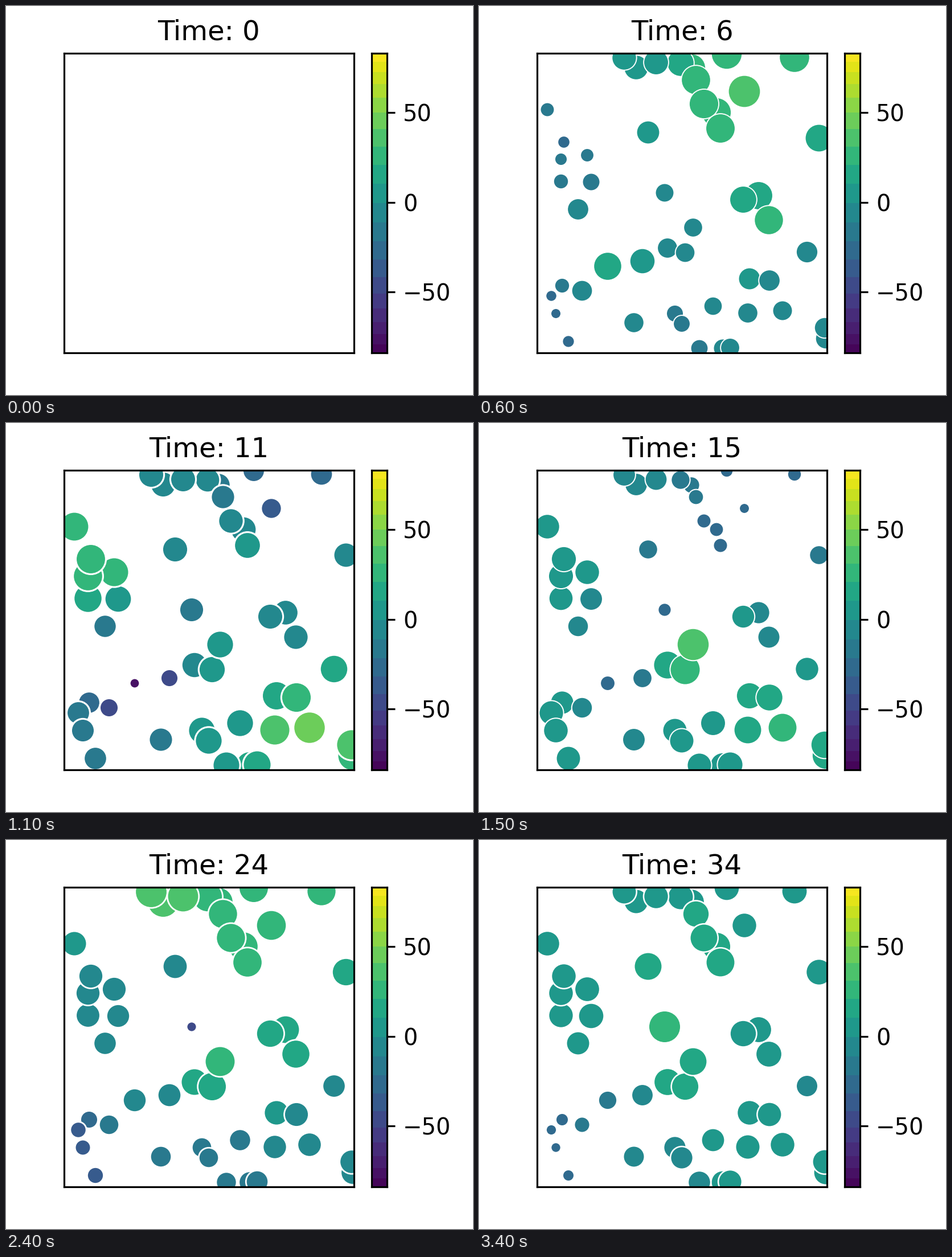
Recreate the animation shown at these times as a matplotlib script. Size 820 px wide and 683 px high, loop 3500 ms.

```python
import numpy as np
import matplotlib.pyplot as plt
from matplotlib.animation import FuncAnimation
from matplotlib.colors import BoundaryNorm, ListedColormap

W, H, DPI = 820, 683, 288
STEPS = 35
LEFT, TOP, RIGHT, BOTTOM = 102, 83, 611, 609
BAR_LEFT, BAR_RIGHT = 642, 669
V_MID, V_HALF = -0.4, 83.6
S_MIN, S_MAX = 20, 200

# Station positions in pixels, back to front.
STATIONS = np.array([
    (276, 108), (255, 91), (373, 109), (354, 100), (311, 99), (381, 130),
    (435, 84), (554, 90), (466, 150), (417, 187), (395, 172), (424, 215),
    (597, 232), (120, 182), (197, 309), (190, 262), (144, 308), (144, 269),
    (149, 239), (174, 357), (297, 222), (326, 328), (491, 333), (464, 340),
    (509, 376), (331, 425), (362, 433), (376, 389), (576, 432), (475, 479),
    (510, 482), (472, 539), (533, 535), (411, 527), (344, 540), (356, 558),
    (272, 556), (287, 448), (226, 457), (146, 491), (181, 500), (127, 509),
    (135, 540), (157, 589), (428, 601), (387, 601), (441, 600), (609, 584),
    (607, 565),
], float)

# One guiding station per region, with its value at each key time.
KEY_TIMES = [6, 11, 19, 24, 29, 34]
GUIDES = {
    1: (8, -5, 2, 40, 5, 4),
    8: (36, -34, -27, 29, -11, 5),
    11: (25, 1, -48, 26, -40, 19),
    18: (-22, 26, -12, -2, 15, 5),
    21: (-9, -12, -39, -50, 22, 30),
    24: (24, -8, 2, 19, 1, 9),
    27: (-8, 7, 64, 30, 2, 15),
    28: (-1, 12, -9, -9, -8, -4),
    32: (-6, 42, 1, -4, 12, 5),
    35: (-13, 7, 2, -21, -1, -2),
    38: (20, -75, 30, -7, -20, -12),
    42: (-25, -19, 30, -36, -19, -27),
}


def distance_weights(power=3):
    gap = STATIONS[:, None] - STATIONS[list(GUIDES)]
    w = (np.hypot(gap[..., 0], gap[..., 1]) + 0.01) ** -power
    return w / w.sum(axis=1, keepdims=True)


WEIGHTS = distance_weights()


def field(t):
    """Values of all stations: linear in time, distance-weighted in space."""
    guide = [np.interp(t, KEY_TIMES, v, period=STEPS) for v in GUIDES.values()]
    return WEIGHTS @ np.array(guide)


def pixel_axes(left, right):
    return fig.add_axes([left / W, 1 - BOTTOM / H,
                         (right - left) / W, (BOTTOM - TOP) / H])


# Colour bands are widest around zero and narrow towards both ends.
s = np.linspace(-1, 1, 21)
bands = V_MID + V_HALF * (s + np.sin(np.pi / 2 * s)) / 2
mids = (bands[:-1] + bands[1:]) / 2
colors = plt.get_cmap("viridis")((mids - bands[0]) / (2 * V_HALF))

plt.rcParams["font.family"] = "DejaVu Sans"
fig = plt.figure(figsize=(W / DPI, H / DPI), dpi=DPI, facecolor="white")

ax = pixel_axes(LEFT, RIGHT)
ax.set(xlim=(LEFT, RIGHT), ylim=(BOTTOM, TOP), xticks=[], yticks=[])
title = ax.set_title("Time: 0", fontsize=12, pad=6)
dots = ax.scatter(*STATIONS.T, c=np.zeros(len(STATIONS)), edgecolors="white",
                  cmap=ListedColormap(colors),
                  norm=BoundaryNorm(bands, len(colors)))

bar = pixel_axes(BAR_LEFT, BAR_RIGHT)
for low, high, color in zip(bands[:-1], bands[1:], colors):
    bar.axhspan(low, high, facecolor=color, linewidth=0)
bar.set(ylim=(bands[0], bands[-1]), xticks=[], yticks=[-50, 0, 50])
bar.yaxis.tick_right()
bar.tick_params(labelsize=10)


def update(step):
    title.set_text(f"Time: {step}")
    dots.set_visible(step > 0)
    v = field(step)
    share = (v - v.min()) / (v.max() - v.min())
    sizes = S_MIN + (S_MAX - S_MIN) * share
    dots.set_array(v)
    dots.set_sizes(sizes)
    dots.set_linewidths([0.08 * np.sqrt(np.percentile(sizes, 10))])
    return dots, title


anim = FuncAnimation(fig, update, frames=STEPS, interval=100,
                     init_func=lambda: update(0), repeat=True, repeat_delay=0)
plt.show()
```
